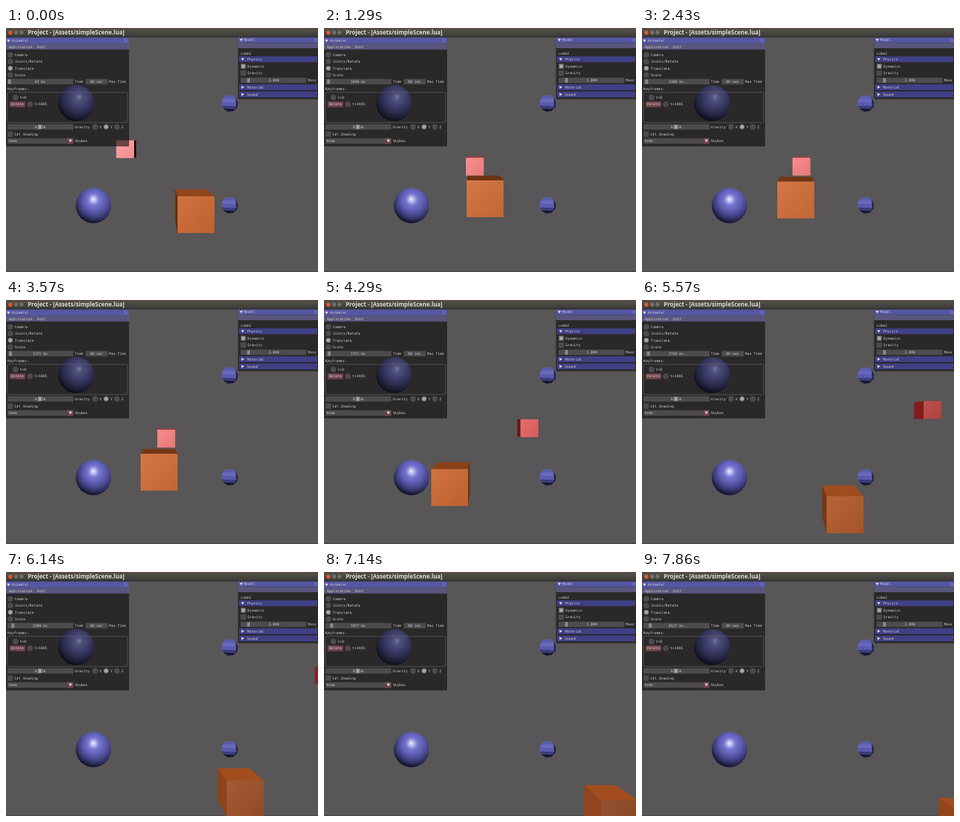
Write an HTML page that moves like this. It is 431 px wide and 338 px high and loops after 8.01 s.

```html
<!DOCTYPE html>
<html lang="en">
<head>
<meta charset="utf-8">
<title>Scene editor</title>
<style>
  html, body { margin: 0; width: 100%; height: 100%; overflow: hidden; background: #585656; }
  svg { display: block; width: 100vw; height: 100vh; }
  .ui text { font: 4.9px "DejaVu Sans Mono", monospace; fill: #d2d0d0; }
  .title { font: bold 8px "Open Sans", sans-serif; fill: #dfdbd2; }
  .panel { fill: rgba(12, 10, 12, .6); }
  .bar { fill: #3f3f86; }
  .top { fill: #5656a2; }
  .menu { fill: #58567c; }
  .field { fill: #4d4b4d; }
  .grab { fill: #8b898a; }
  .close { fill: #6464b8; }
  .on { fill: #aaa7a6; }
  .red { fill: #75444a; }
  .mark { fill: #dcdada; }
  .frame { fill: none; stroke: #5e5c64; stroke-width: .8; }
</style>
</head>
<body>
<svg viewBox="0 0 431 338" preserveAspectRatio="none">
  <defs>
    <radialGradient id="glossy" cx=".57" cy=".36" r=".68" fx=".49" fy=".32">
      <stop offset="0" stop-color="#f4f4ff"/>
      <stop offset=".09" stop-color="#c0c0f0"/>
      <stop offset=".24" stop-color="#7676d0"/>
      <stop offset=".5" stop-color="#5858ac"/>
      <stop offset=".75" stop-color="#36366e"/>
      <stop offset="1" stop-color="#080812"/>
    </radialGradient>
    <radialGradient id="dull" cx=".57" cy=".36" r=".68" fx=".58" fy=".33">
      <stop offset="0" stop-color="#77779a"/>
      <stop offset=".14" stop-color="#50507e"/>
      <stop offset=".45" stop-color="#393964"/>
      <stop offset=".75" stop-color="#22223e"/>
      <stop offset="1" stop-color="#08080e"/>
    </radialGradient>
    <linearGradient id="chrome" x2="0" y2="1">
      <stop offset="0" stop-color="#55534c"/>
      <stop offset="1" stop-color="#3a3935"/>
    </linearGradient>
    <linearGradient id="shade" x2="1" y2="1">
      <stop offset="0" stop-color="#fff" stop-opacity=".07"/>
      <stop offset="1" stop-color="#000" stop-opacity=".07"/>
    </linearGradient>
    <clipPath id="round"><path d="M-5-11H4L9-7 11.5-1 10.5 5 5 10.5-2 11.5-8 8-11.5 2-10.5-5Z"/></clipPath>
    <g id="faceted" clip-path="url(#round)">
      <rect x="-12" y="-12" width="24" height="24" fill="#6868bc"/>
      <path d="M-12-12H12V-7L-12-6Z" fill="#5c5cae"/>
      <path d="M-12-2 12-1V4L-12 3Z" fill="#5a5aac"/>
      <path d="M-12 3 12 4V8L-12 7Z" fill="#3c3c7a"/>
      <path d="M-12 7 12 8V12H-12Z" fill="#16162c"/>
      <path d="M8-12H12V12H4L9 4Z" fill="#0c0c1a" opacity=".75"/>
    </g>
  </defs>

  <rect width="431" height="338" fill="#585656"/>
  <rect y="337" width="431" height="1" fill="#444242"/>
  <circle cx="120.8" cy="246" r="24.4" fill="url(#glossy)"/>
  <use href="#faceted" x="309" y="104.5"/>
  <use href="#faceted" x="309" y="245.5"/>
  <g id="cubes"></g>

  <rect width="431" height="13" fill="url(#chrome)"/>
  <rect width="431" height=".8" fill="#6a4038"/>
  <rect y="12" width="431" height="1" fill="#2b2a28"/>
  <circle cx="6" cy="6.3" r="2.9" fill="#d65a36"/>
  <circle cx="14" cy="6.3" r="2.7" fill="#74716a"/>
  <circle cx="21.5" cy="6.3" r="2.7" fill="#74716a"/>
  <text class="title" x="30" y="9.2">Project - [Assets/simpleScene.lua]</text>
  <g class="ui" id="ui"></g>
</svg>
<script>
const NS = "http://www.w3.org/2000/svg";
const byId = id => document.getElementById(id);

// Interface pieces, each returning markup
const rect = (cls, x, y, w, h, r = 0) =>
  `<rect class="${cls}" x="${x}" y="${y}" width="${w}" height="${h}" rx="${r}"/>`;
const label = (x, y, s, extra = "") => `<text x="${x}" y="${y + 1.8}" ${extra}>${s}</text>`;
const centred = (x, y, s, id) => label(x, y, s, `text-anchor="middle"${id ? ` id="${id}"` : ""}`);
const dot = (cls, x, y, r) => `<circle class="${cls}" cx="${x}" cy="${y}" r="${r}"/>`;
const radio = (x, y, s, on) =>
  dot("field", x, y, 3.9) + (on ? dot("on", x, y, 2.8) : "") + label(x + 6, y, s);
const check = (x, y, s, on) =>
  rect("field", x, y - 3.8, 7.6, 7.6) + (on ? rect("on", x + 1.2, y - 2.6, 5.2, 5.2) : "") + label(x + 9.5, y, s);
const arrow = (x, y, open) =>
  `<path class="mark" d="M${x} ${y}${open ? "m-2.3-1.6h4.6l-2.3 3.8" : "m-1.6-2.3v4.6l3.8-2.3"}z"/>`;
const header = (y, s, open) =>
  rect("bar", 322, y - 4, 108, 8) + arrow(327, y, open) + label(333, y, s);

byId("ui").innerHTML = [
  rect("panel", 0, 13, 170, 151, 1),
  `<circle cx="97" cy="104" r="25" fill="url(#dull)"/>`,
  rect("top", 0, 13, 170, 8.8), arrow(3.5, 17.5, true), label(8, 17.5, "Animator"), dot("close", 165.6, 17.3, 3),
  rect("menu", 0, 21.8, 170, 8), label(4, 26, "Application"), label(43, 26, "Edit"),
  ...["Camera", "Joints/Rotate", "Translate", "Scale"].map((s, i) => radio(6, 37.2 + i * 9.3, s, i === 2)),
  rect("field", 2, 70.5, 91, 7.6), `<rect class="grab" id="grab" y="71.2" width="4" height="6.2"/>`,
  centred(47, 74.4, "", "clock"), label(95, 74.4, "Time"),
  rect("field", 110, 70.5, 30.5, 7.6), centred(125, 74.4, "60 sec"), label(142.5, 74.4, "Max Time"),
  label(2, 84.6, "Keyframes:"), rect("frame", 2, 89, 166, 42, 2),
  radio(13, 96.2, "t=0"), rect("red", 5, 101.8, 21.5, 7.8), label(7, 105.6, "Delete"), radio(33, 105.6, "t=1485"),
  rect("field", 2, 133.2, 91, 7.6), rect("grab", 44, 133.9, 5, 6.2), centred(47, 137, "9.810"), label(95, 137, "Gravity"),
  radio(123, 137, "X"), radio(138.3, 137, "Y", true), radio(153.2, 137, "Z"),
  check(2, 147, "Cel Shading"),
  rect("field", 2, 152.7, 91, 7.6), rect("red", 85, 152.7, 8, 7.6), arrow(89, 156.2, true),
  label(3.5, 156.5, "none"), label(95, 156.5, "Skybox"),

  rect("panel", 320.5, 13, 111, 85.5, 1),
  rect("top", 320.5, 13, 111, 7.5), arrow(325, 16.6, true), label(329, 16.6, "Model"), dot("close", 428, 17, 3),
  rect("menu", 320.5, 20.5, 111, 7.5), label(324, 35, "cube2"),
  header(43.3, "Physics", true), check(324, 53, "Dynamics", true), check(324, 62.5, "Gravity"),
  rect("field", 324, 68.7, 91, 7.6), rect("grab", 333, 69.4, 4, 6.2), centred(370, 72.5, "1.000"), label(417, 72.5, "Mass"),
  header(82, "Material"), header(92, "Sound")
].join("");

// Linear interpolation through rows of [key, ...values]
function sample(rows, key) {
  let i = 1;
  while (i < rows.length - 1 && rows[i][0] < key) i++;
  const a = rows[i - 1], b = rows[i];
  const p = Math.min(1, Math.max(0, (key - a[0]) / (b[0] - a[0])));
  return a.slice(1).map((v, j) => v + (b[j + 1] - v) * p);
}

const LOOP = 8010, STEPS = 56, STEP = LOOP / STEPS;
const EYE = [213, 165];

// [step, scene clock in ms]; the clock pauses in the middle
const clockRows = [[0, 43], [9, 1040], [10, 1140], [11, 1160], [24, 1160], [25, 1171],
  [35, 2270], [43, 3209], [50, 3977], [55, 4517]];

// Rows: [scene clock, x, y, lightness of front, top, side]
const cubes = [
  {
    size: 51, depth: .14,
    front: l => `hsl(21 61% ${l}%)`, side: l => `hsl(21 68% ${l}%)`,
    rows: [[43, 237, 233, 50, 34, 23], [1040, 197, 211, 52, 25, 20], [1171, 186, 213, 52, 27, 20],
      [1690, 145, 233, 50, 32, 20], [2270, 205, 255, 48, 37, 22], [3209, 305, 289, 38, 38, 33],
      [3977, 383, 316.5, 34, 38, 34], [4517, 442, 337, 32, 38, 34]]
  },
  {
    size: 24.7, depth: .075,
    front: l => `hsl(0 ${l * 1.7 - 38}% ${l}%)`, side: l => `hsl(0 65% ${l}%)`,
    rows: [[43, 152.3, 155.5, 80, 45, 5], [1040, 196, 179.7, 75, 45, 20], [1171, 209, 179.7, 74, 45, 22],
      [2270, 334, 151, 54, 40, 28], [3209, 444, 129, 46, 36, 34], [4517, 597, 98, 46, 36, 34]]
  }
];

for (const cube of cubes) {
  cube.faces = Array.from({ length: 6 }, () => {
    const face = document.createElementNS(NS, "polygon");
    byId("cubes").append(face);
    return face;
  });
}

function drawCube({ size, depth, front, side, rows, faces }, clock) {
  const [x, y, frontL, topL, sideL] = sample(rows, clock);
  const near = [[x, y], [x + size, y], [x + size, y + size], [x, y + size]];
  const far = near.map(p => p.map((v, i) => v + (EYE[i] - v) * depth));
  // Top, right, bottom, left: only sides turned to the eye are seen
  const seen = [y > EYE[1], x + size < EYE[0], y + size < EYE[1], x > EYE[0]];
  const paint = (i, points, fill) => {
    faces[i].setAttribute("points", points.join(" "));
    faces[i].setAttribute("fill", fill);
  };
  for (let i = 0; i < 4; i++) {
    const j = (i + 1) % 4;
    paint(i, [near[i], near[j], far[j], far[i]], seen[i] ? side(i === 0 ? topL : sideL) : "none");
  }
  paint(4, near, front(frontL));
  paint(5, near, "url(#shade)");
}

const start = performance.now();
function draw() {
  const t = (performance.now() - start) % LOOP;
  const step = Math.min(STEPS - 1, Math.floor((t + 12) / STEP));
  const [clock] = sample(clockRows, step);
  cubes.forEach(cube => drawCube(cube, clock));
  byId("clock").textContent = Math.round(clock) + " ms";
  byId("grab").setAttribute("x", 2.6 + clock * .0015);
  requestAnimationFrame(draw);
}
draw();
</script>
</body>
</html>
```
